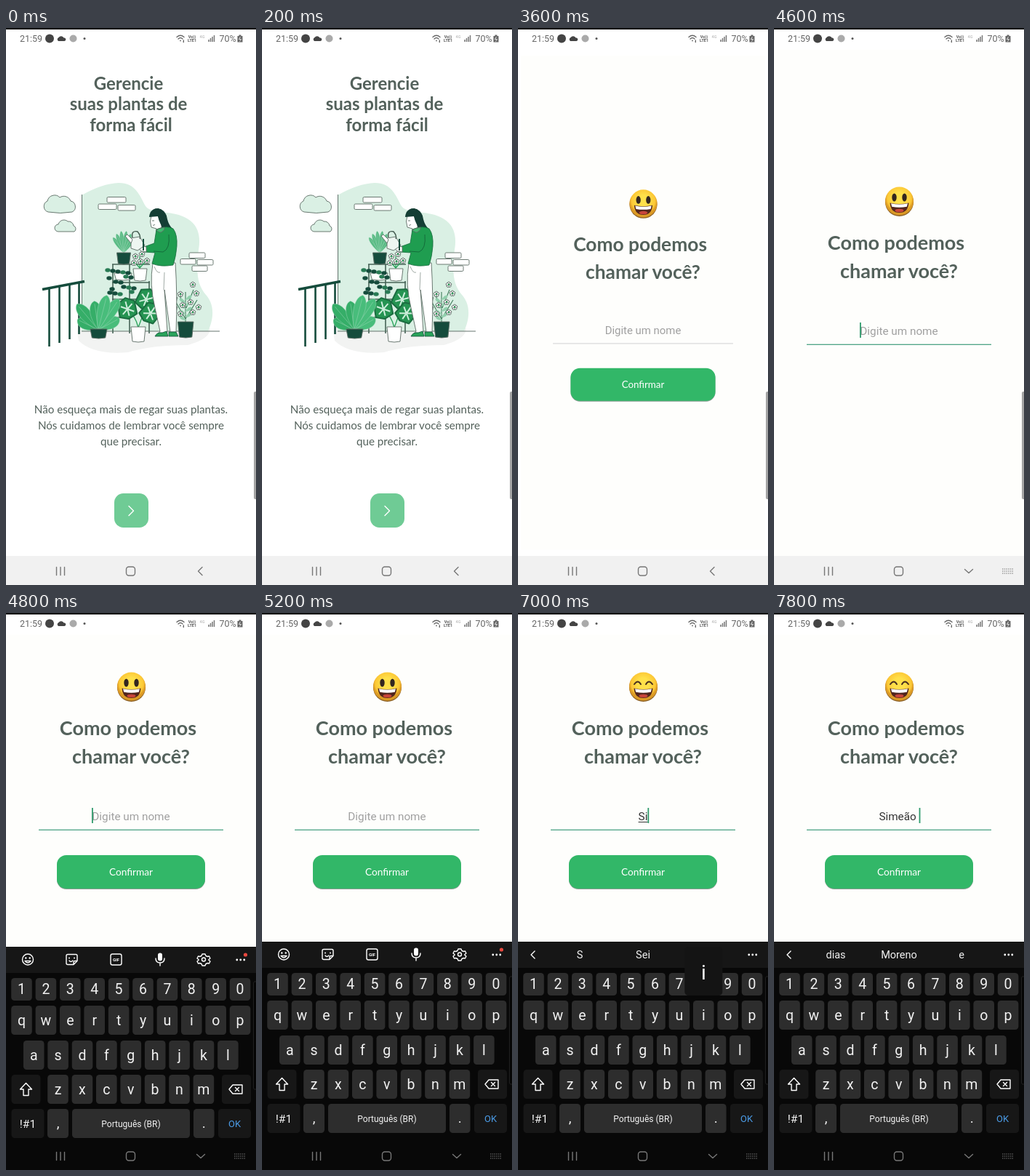
These frames come from a looping animation (344 by 766 pixels, 8000 ms). An HTML page:

```html
<!DOCTYPE html>
<html lang="pt-BR">
<head>
<meta charset="utf-8">
<title>Plantas</title>
<style>
html, body { margin: 0; width: 100%; height: 100%; overflow: hidden; background: #fff; }
svg { display: block; width: 100vw; height: 100vh; }
text { font-family: Roboto, sans-serif; text-anchor: middle; white-space: pre; }
.title, .body { font-family: Jost, Lato, sans-serif; fill: #53615b; }
.title { font-weight: 700; }
.body { font-size: 15.2px; }
.line { fill: none; stroke: #fff; stroke-width: 1.4; stroke-linecap: round; stroke-linejoin: round; }
.status { fill: #666; font-size: 12.5px; }
.ink { stroke: #5c6b64; stroke-width: .9; stroke-linejoin: round; }
</style>
</head>
<body>
<svg viewBox="0 0 344 766" preserveAspectRatio="none">
  <defs>
    <radialGradient id="face" cy=".4"><stop offset=".4" stop-color="#ffe04a"/><stop offset=".85" stop-color="#fcc735"/><stop offset="1" stop-color="#dc9a25"/></radialGradient>
  </defs>
  <rect width="344" height="766" fill="#fff"/>

  <g id="welcome">
    <g font-size="24">
      <text class="title" x="168.5" y="84.5">Gerencie</text>
      <text class="title" x="168.5" y="113">suas plantas de</text>
      <text class="title" x="172" y="141.5">forma fácil</text>
    </g>
    <g id="art"></g>
    <text class="body" x="172" y="529.500">Não esqueça mais de regar suas plantas.</text>
    <text class="body" x="172" y="551.500">Nós cuidamos de lembrar você sempre</text>
    <text class="body" x="172" y="573.500">que precisar.</text>
    <rect x="149" y="640" width="47" height="47" rx="12.5" fill="#6fcb95"/>
    <path class="line" d="M169 657.500l6.500 6.500-6.500 6.500" stroke-width="2"/>
  </g>

  <g id="naming">
    <rect y="30" width="344" height="696" fill="#fefefc"/>
    <g id="form">
      <circle cx="172.500" cy="102.500" r="19.500" fill="#8f6428"/>
      <circle cx="172.500" cy="101" r="19.500" fill="url(#face)"/>
      <g id="eyesOpen" fill="#33261f"><ellipse cx="165.500" cy="96" rx="3.200" ry="5.500"/><ellipse cx="179.500" cy="96" rx="3.200" ry="5.500"/></g>
      <path id="eyesShut" class="line" style="stroke:#4a3020;stroke-width:2" d="M160 98q5-7 9 0m7 0q4-7 9 0"/>
      <path d="M159.500 103.500q13 3 26 0-1 13.500-13 13.500t-13-13.500z" fill="#52261d"/>
      <path d="M161 104.200q11.500 2.500 23 0l-1.200 4.500q-10.300 2-20.600 0z" fill="#fff"/>
      <ellipse cx="172.500" cy="114" rx="6" ry="2.300" fill="#c9453b"/>
      <g font-size="27">
        <text class="title" x="168" y="168">Como podemos</text>
        <text class="title" x="172" y="207">chamar você?</text>
      </g>
      <text id="field" x="172" y="285" font-size="15.300"></text>
      <rect id="composing" y="287" height="1" fill="#333"/>
      <rect id="cursor" y="268" width="1.800" height="21" fill="#2f9b6c"/>
      <rect id="underline" x="45" y="297.700" width="254" height="1.200"/>
      <g id="confirm">
        <rect x="70" y="334" width="204" height="46" rx="13" fill="#8a9d92"/>
        <rect x="70" y="333" width="204" height="46" rx="13" fill="#32b768"/>
        <text x="172" y="361" font-size="13.700" fill="#fff" style="font-family:Jost,Lato,sans-serif">Confirmar</text>
      </g>
    </g>
  </g>

  <rect width="344" height="30" fill="#fff"/>
  <rect width="344" height="2" fill="#000"/>
  <text class="status" x="34.500" y="19">21:59</text>
  <circle cx="60" cy="14.500" r="6" fill="#444"/>
  <path d="M72 18a2.800 2.800 0 0 1 .5-5 4 4 0 0 1 7 .5 2.300 2.300 0 0 1 1 4.500z" fill="#444"/>
  <circle cx="92.500" cy="14.500" r="5" fill="#aaa"/>
  <circle cx="108" cy="14.500" r="1.500" fill="#555"/>
  <path class="line" style="stroke:#666" d="M235 12.500q5-4.500 10 0m-8 2.500q3-3 6 0m-3.300 2.500h.6m4-.5v2.500"/>
  <text x="256" y="14" font-size="5.500" font-weight="700" fill="#555">Vo))</text>
  <text x="256" y="19" font-size="5.500" font-weight="700" fill="#555">LTE1</text>
  <text x="270" y="14" font-size="5.500" fill="#aaa">4G</text>
  <path d="M279 19v-3m2.500 3v-5m2.500 5v-7m2.500 7v-9" stroke="#777" stroke-width="1.500"/>
  <text class="status" x="305" y="19">70%</text>
  <path d="M318.500 11h2v-1.500h3V11h2v8.500h-7z" fill="#666"/>
  <path d="M322.500 12l-2 3.500h3l-2 3" stroke="#fff" stroke-width=".8" fill="none"/>

  <rect y="726" width="344" height="40" fill="#f1f1f1"/>
  <rect x="341" y="500" width="6" height="148" rx="2" fill="#a5a5a5"/>
  <g id="keyboard"></g>

  <g class="line" style="stroke:#777">
    <path d="M69.500 741.500v11m5.500-11v11m5.500-11v11"/>
    <rect x="165.500" y="741" width="12" height="12" rx="3.500"/>
    <path id="back" d="M270 741.500l-5.500 5.500 5.500 5.500"/>
    <g id="hide">
      <path d="M262.500 744.500l5.500 5 5.500-5"/>
      <path style="stroke-width:1.200;stroke-linecap:butt" stroke-dasharray="1.500 1.200" d="M314 744h15m-15 3h15m-15 3h15"/>
    </g>
  </g>
</svg>
<script>
const $ = id => document.getElementById(id);
const LOOP = 8000, STEP = 200;
const DARK = '#154c3c', GREEN = '#29a35a', MINT = '#daf0e4';

// ---------- illustration ----------
const path = (d, fill, extra = '') => `<path d="${d}" fill="${fill}" ${extra}/>`;
const inked = (d, fill = '#fff') => path(d, fill, 'class="ink"');
const stroke = (d, color, width) => path(d, 'none', `stroke="${color}" stroke-width="${width}"`);
const leaf = (x, y, length, width, angle, fill) =>
  path(`M0 0C${-width} ${-length * .45} ${-width} ${-length * .9} 0 ${-length}C${width} ${-length * .9} ${width} ${-length * .45} 0 0V${-length * .9}`, fill,
    `transform="translate(${x} ${y}) rotate(${angle})" stroke="#a9dbc0" stroke-width=".4"`);
const brick = (x, y, w) => `<rect class="ink" x="${x}" y="${y}" width="${w}" height="7.5" rx="1.5" fill="#fff"/>`;
const pot = (x, y, w, h, fill) => inked(`M${x} ${y}h${w}l${-w * .1} ${h}q${-w * .4} 2 ${-w * .8} 0z`, fill);
const flower = (x, y) => [0, 72, 144, 216, 288].map(a =>
  `<circle class="ink" cx="${x}" cy="${y - 2.2}" r="1.7" fill="#fff" transform="rotate(${a} ${x} ${y})"/>`).join('') +
  `<circle cx="${x}" cy="${y}" r="1.2" fill="${GREEN}"/>`;
const patterned = (x, y, angle) => `<g transform="translate(${x} ${y}) rotate(${angle})">` +
  path('M-2 14L-13 9-11-10 1-15 12-8 11 10z', '#259452', 'stroke="#1a6d40" stroke-linejoin="round" stroke-width="2"') +
  stroke('M0 10V-10M-8-5L8 6M-8 6L8-5', '#cdeedb', 2) + '</g>';

function illustration() {
  let s = path('M104 395Q96 410 100 430Q120 450 168 446 200 436 250 436 280 428 281 414L240 390z', '#f2f3f2');
  s += path('M104 230Q132 214 155 213C179 213 184 231 192 245C200 256 225 251 243 259C266 268 268 288 265 305C262 336 262 352 276 368C289 384 284 404 278 417H104z', MINT);
  s += stroke('M104.500 229V395M104 417H294', '#56665f', .9);
  s += inked('M58 253a8 8 0 0 1-1-15 10 10 0 0 1 17-5 10 10 0 0 1 15 5 8 8 0 0 1 2 15q-16 3-33 0z', MINT);
  s += inked('M72 280a5 5 0 0 1 0-10 8 8 0 0 1 13-4 7 7 0 0 1 8 6 4.500 4.500 0 0 1 1 8z', MINT);
  s += [[139, 232.5, 26], [127, 242, 25], [154, 243.5, 24], [252, 309, 22], [240, 317.5, 21], [263, 318.5, 22], [256, 327, 21]]
    .map(b => brick(...b)).join('');
  s += stroke('M50 359.500L108 348.500', DARK, 3.4) + stroke('M59.500 358V438M73.500 355V433M87.500 352V428M100.500 350V421', DARK, 2.6);

  // shelves
  s += stroke('M147 325V420M170 325V420M197 348V420M146 325H198M146 350H198M146 373H198M147 398H171', '#466457', 1.6);
  for (let a = -35; a <= 35; a += 14) s += leaf(162, 309, 31 - Math.abs(a) * .15, 3.6, a, '#55b981');
  s += pot(152.5, 309, 19, 15, DARK);
  s += pot(149, 337, 24, 9, '#fff');
  for (let i = 0; i < 18; i++)
    s += `<ellipse cx="${140 + i * 11 % 37}" cy="${333 + i * 7 % 9 + (i % 4) * 9}" rx="3.700" ry="2.700" fill="${i % 3 ? DARK : '#287b54'}"/>`;
  s += stroke('M184 332V314M184 330L176 321M184 330L193 320', GREEN, 1.2);
  s += [[178, 314], [187, 311], [194, 320], [176, 323], [185, 321]].map(f => flower(...f)).join('');
  s += pot(175, 331, 19, 16, '#fff');
  s += stroke('M182 412Q178 395 168 390M182 412Q188 395 194 380', GREEN, 1.3);
  s += patterned(167, 386, -15) + patterned(193, 373, 20) + patterned(199, 392, 35);
  s += pot(172, 411, 20, 20, '#fff');

  // broad-leaved plant
  s += [[-64, 32], [62, 33], [-40, 46], [34, 51], [-8, 40], [14, 49]]
    .map(([a, len], i) => leaf(127, 415, len, 10.5, a, ['#35ae68', '#48bd7b'][i % 2])).join('');
  s += pot(116, 414, 23, 12, DARK);

  // flowering plant
  s += stroke('M247 405V363M247 400L232 374M247 400L263 374M248 385L258 360M246 385L239 368', '#3f7b5a', 1.1);
  for (let i = 0; i < 8; i++) s += leaf(247, 402 - i * 4, 10, 2.6, i % 2 ? 55 : -55, '#8ccda8');
  s += [[232, 372], [240, 366], [257, 353], [262, 365], [232, 385], [254, 377], [265, 384], [243, 381], [240, 393], [257, 391]]
    .map(f => flower(...f)).join('');
  s += pot(236.5, 404, 21.5, 21, DARK);

  // woman with watering can
  s += path('M199 254Q203 246 213 249Q221 253 222 263Q224 271 229 276Q222 284 212 280z', '#143e34');
  s += inked('M200 258Q197 266 200 274l7 2v5h8l-2-16-5-8q-5 1-8 1z');
  s += path('M197 260Q198 248 210 248Q220 256 219 278Q211 270 209 259z', '#143e34');
  s += stroke('M201 265h3M202 271q2 1 3-1', '#465b50', .8);
  s += inked('M202 324Q197 352 205 385L212 417l-4 5h11l3-4-4-58 8 58h8q2-50-1-95z');
  s += stroke('M218 336L217 360M204 328q4 10 8 8', '#8a9690', .8);
  s += path('M205 424q3-6 10-5l6-2 2 7zM224 418h10l3 6h-13z', GREEN, `stroke="${DARK}" stroke-width=".8"`);
  s += path('M207 277Q221 271 230 276Q236 284 235 300Q234 314 230 326Q213 329 201 324L205 309 190 308v-7L204 296z', '#1f9d50', 'stroke="#176a3d" stroke-width=".8"');
  s += inked('M207 278q5 5 8 2 4-2 3-6l-8 2z', '#42b970');
  s += stroke('M224 284Q226 304 216 308L203 307', '#146738', .9);
  s += inked('M193 301l-7-2-4 3 4 5 7 1z');
  s += inked('M172 289l12-2 7 12-10 7-9-3z', '#eef6f1') + inked('M172 296l-8-10 3-2 7 7z');
  s += stroke('M174 288Q172 278 181 280Q186 286 184 290', '#41584d', 1.4);
  return s + stroke('M189 290v16', DARK, 2);
}
$('art').innerHTML = illustration();

// ---------- keyboard ----------
const PITCH = 33.4;
const label = (x, y, text, size, fill = '#f2f2f2', extra = '') =>
  `<text x="${x}" y="${y}" font-size="${size}" fill="${fill}" ${extra}>${text}</text>`;
const key = (x, y, w, h, fill = '#2d2d2d', id = '') =>
  `<rect ${id && `id="${id}"`} x="${x}" y="${y}" width="${w}" height="${h}" rx="4.500" fill="${fill}"/>`;
const icon = (d, extra = '') => `<path class="line" d="${d}" ${extra}/>`;
const keyRow = (chars, x, y, h) => [...chars].map((c, i) => {
  const cx = x + i * PITCH;
  return key(cx - 14.3, y, 28.6, h, '#2d2d2d', 'key-' + c) + label(cx, y + h / 2 + 6.8, c, 19.5, '#f2f2f2', 'data-char');
}).join('');
const ring = (x, y, r) => `<circle class="line" cx="${x}" cy="${y}" r="${r}"/>`;
const dot = (x, y, r, fill = '#fff') => `<circle cx="${x}" cy="${y}" r="${r}" fill="${fill}"/>`;

$('keyboard').innerHTML = `
  <rect y="452" width="344" height="330" fill="#080808"/>
  <rect y="452" width="344" height="36" fill="#161616"/>
  <g id="tools">
    ${ring(30, 469.5, 7.5)}${dot(27.3, 467.5, 1.2)}${dot(32.7, 467.5, 1.2)}${icon('M26 471.500q4 5 8 0z')}
    ${icon('M85 462.500h11q2 0 2 2v7l-5 5h-8q-2 0-2-2v-10q0-2 2-2zM98 471.500h-3q-2 0-2 2v3M87 471q2 3 5 0')}
    ${dot(87, 467.5, 1)}${dot(94, 467.5, 1)}
    <rect class="line" x="144" y="462" width="15" height="15" rx="2.500"/>${label(151.5, 472, 'GIF', 6, '#fff', 'font-weight="700"')}
    <rect x="209" y="460.500" width="6" height="11" rx="3" fill="#fff"/>${icon('M206 468q0 6 6 6t6-6M212 474v4')}
    ${ring(272, 469.5, 2.5)}${icon('M270 462h4l1 2.500 2.500 1 2-.5 1.500 3-2 1.500v1l2 1.500-1.500 3-2-.5-2.500 1-1 2.500h-4l-1-2.500-2.500-1-2 .5-1.500-3 2-1.500v-1l-2-1.500 1.500-3 2 .5 2.500-1z')}
    ${dot(329.5, 463, 2.6, '#e9493f')}
  </g>
  <g id="suggestions">${icon('M23 465l-5 5 5 5', 'stroke-width="1.800"')}
    ${[85, 172, 258].map(x => label(x, 475, '', 14.5, '#f2f2f2', 'data-word')).join('')}</g>
  ${[317.8, 322.8, 327.8].map(x => dot(x, 470, 1.4)).join('')}
  ${keyRow('1234567890', 21.5, 495, 31)}
  ${keyRow('qwertyuiop', 21.5, 533, 40)}
  ${keyRow('asdfghjkl', 38.2, 581, 40)}
  ${keyRow('zxcvbnm', 71.5, 628, 40)}
  ${key(7.5, 628, 40, 40, '#171717')}<path id="shift" class="line" d="M27.500 639.500l8 8.500h-4.500v8.500h-7v-8.500h-4.500z"/>
  ${key(297, 628, 40, 40, '#171717')}${icon('M312 642h13v12h-13l-5-6zM315.500 645.500l5 5m0-5l-5 5')}
  ${key(7.5, 675, 45, 40, '#171717')}${label(30, 701, '!#1', 15.5)}
  ${key(57, 675, 29, 40)}${label(71.5, 701, ',', 19)}
  ${key(91, 675, 162, 40)}${label(172, 699.5, 'Português (BR)', 12)}
  ${key(258, 675, 28.6, 40)}${label(272.3, 701, '.', 19)}
  ${key(292, 675, 45, 40, '#171717')}${label(314.5, 700, 'OK', 13, '#4b9be6')}
  <path d="M344 500h-2q-1.500 0-1.500 2v144q0 2 1.500 2h2" fill="#050505" stroke="#202020"/>
  <g id="popup"><rect x="-26" y="-36" width="52" height="67" rx="5" fill="#141414"/><text id="popupChar" y="9" font-size="28" fill="#fff"></text></g>`;
const letters = [...document.querySelectorAll('[data-char]')].map(el => ({ el, char: el.textContent }));
const words = document.querySelectorAll('[data-word]');

// ---------- timeline ----------
const show = (id, visible) => $(id).style.display = visible ? '' : 'none';
const clamp = v => Math.min(1, Math.max(0, v));
const latest = (list, t) => list.filter(([at]) => t >= at).pop()[1];
const zoom = (id, scale, opacity) => {
  $(id).setAttribute('transform', `translate(172 378) scale(${scale}) translate(-172 -378)`);
  $(id).style.opacity = opacity;
};
const TYPED = [[0, ''], [6000, 'S'], [7000, 'Si'], [7800, 'Simeão ']];
const CURSOR = [[0, false], [4600, true], [5000, false], [5400, true], [6600, false], [7000, true], [7600, false], [7800, true]];
const WORDS = [[0, ['', '', '']], [6400, ['S', 'Se', 'Só']], [6600, ['S', 'Sei', 'Só']], [7400, ['Si', 'Sim', 'Sinal']],
  [7600, ['Si', 'Simeão', 'Sim']], [7800, ['dias', 'Moreno', 'e']]];

function render(t) {
  const enter = 1 - (1 - clamp((t - 3300) / 500)) ** 2;
  const opacity = clamp(enter / .7);
  zoom('welcome', 1 + .15 * enter, opacity < 1 ? 1 : 0);
  zoom('naming', .85 + .15 * enter, opacity);

  const focused = t >= 4600, keyboard = t >= 4800, upper = t >= 5400 && t < 6200;
  $('form').setAttribute('transform', `translate(0 ${keyboard ? 0 : 137})`);
  show('confirm', !focused || keyboard);
  show('back', !focused);
  show('hide', focused);
  $('underline').setAttribute('fill', focused ? '#3f9c7c' : '#d8d8d8');

  const typed = latest(TYPED, t), composing = typed && !typed.endsWith(' ');
  const field = $('field');
  field.textContent = typed || 'Digite um nome';
  field.setAttribute('fill', typed ? '#333' : '#a0a0a0');
  const width = field.getComputedTextLength();
  $('composing').setAttribute('x', 172 - width / 2);
  $('composing').setAttribute('width', width);
  show('composing', composing);
  $('cursor').setAttribute('x', typed ? 172 + width / 2 : 118);
  show('cursor', latest(CURSOR, t));
  show('eyesOpen', t < 6200);
  show('eyesShut', t >= 6200);

  show('keyboard', keyboard);
  $('keyboard').setAttribute('transform', `translate(0 ${t < 5000 ? 7 : 0})`);
  letters.forEach(({ el, char }) => el.textContent = upper ? char.toUpperCase() : char);
  $('shift').style.stroke = upper ? '#4b9be6' : '#fff';
  $('key-s').setAttribute('fill', t === 6000 ? '#666' : '#2d2d2d');
  show('tools', t < 6200);
  show('suggestions', t >= 6200);
  latest(WORDS, t).forEach((word, i) => words[i].textContent = word);

  show('popup', t === 6000 || t === 7000);
  $('popup').setAttribute('transform', t === 6000 ? 'translate(71.500 542)' : 'translate(255.300 495)');
  $('popupChar').textContent = t === 6000 ? 'S' : 'i';
}

let start;
function tick(now) {
  start ??= now;
  render(Math.floor((now - start) % LOOP / STEP) * STEP);
  requestAnimationFrame(tick);
}
render(0);
requestAnimationFrame(tick);
</script>
</body>
</html>
```
